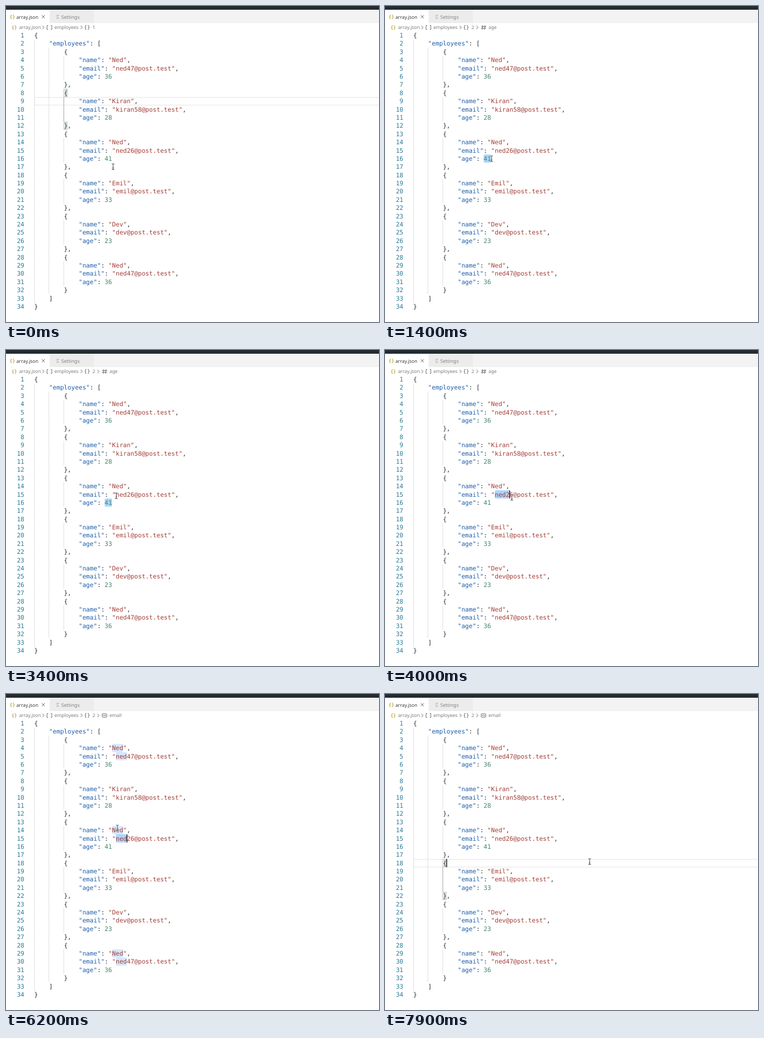
Animation, 700 px wide and 592 px high, one loop 8 s. Source, as an HTML page:

```html
<!DOCTYPE html>
<html lang="en">
<head>
<meta charset="utf-8">
<title>array.json</title>
<style>
html, body { margin: 0; width: 100%; height: 100%; overflow: hidden; background: #fff; }
svg { display: block; width: 700px; height: 592px; }
text { white-space: pre; text-rendering: geometricPrecision; }
.code { font: 11.55px "DejaVu Sans Mono", monospace; fill: #2a2f36; }
.num { fill: #2b7a97; text-anchor: end; }
.key { fill: #2060a8; }
.str { fill: #a43f37; }
.int { fill: #45836a; }
.ui { font: 8.9px "Noto Sans", sans-serif; fill: #3a3a3a; }
.dim { font-size: 9.1px; fill: #828282; }
.crumb { fill: #7b7b7b; }
.json { font: bold 8.5px "DejaVu Sans Mono", monospace; fill: #b8a640; }
.sym { font: 9.5px "DejaVu Sans Mono", monospace; fill: #555; }
.line { fill: none; stroke: #666; stroke-width: 1; }
</style>
</head>
<body>
<svg id="stage" viewBox="0 0 700 592"></svg>
<script>
const LOOP = 8000, STEP = 100;
const CHAR = 11.55 * 0.60205, ROW = 15.394, LEFT = 53, TOP = 47.3;
const colX = c => LEFT + c * CHAR;
const rowY = n => TOP + (n - 1) * ROW;

const person = (name, user, age) => ({ name, email: user + "@post.test", age });
const doc = JSON.stringify({
  employees: [
    person("Ned", "ned47", 36),
    person("Kiran", "kiran58", 28),
    person("Ned", "ned26", 41),
    person("Emil", "emil", 33),
    person("Dev", "dev", 23),
    person("Ned", "ned47", 36)
  ]
}, null, 4).split("\n");

// Each entry changes part of the editor state at its time.
const edits = [
  { t: 0, line: 9, pair: [8, 12], crumb: "1", caret: null, sel: null, marks: false },
  { t: 600, line: 16, pair: [13, 17], caret: [16, 19] },
  { t: 700, crumb: "age" },
  { t: 900, line: 0, pair: null, sel: [16, 19, 20], caret: [16, 20], marks: true },
  { t: 1100, sel: [16, 19, 21], caret: [16, 21] },
  { t: 3700, pair: [13, 17], sel: [15, 22, 25], caret: [15, 25] },
  { t: 3900, pair: null, sel: [15, 22, 26], caret: [15, 26], marks: false },
  { t: 4100, crumb: "email" },
  { t: 4700, sel: [15, 22, 25], caret: [15, 25] },
  { t: 5000, marks: true },
  { t: 7800, line: 18, sel: null, caret: [18, 9], marks: false },
  { t: 7900, pair: [18, 22] }
];
const caretOff = [[1400, 1900], [2400, 3000], [3400, 3700], [5600, 6000], [6500, 7100], [7500, 7800]];

// Pointer moves: first step time, number of steps, end point.
const moves = [
  [100, 4, 186, 290], [600, 7, 200, 286], [2300, 2, 199, 313], [3000, 5, 207, 273],
  [3700, 1, 225, 274], [3900, 2, 238, 276], [4100, 1, 239, 276], [4300, 3, 241, 276],
  [4700, 2, 231, 276], [5000, 2, 230, 276], [5300, 1, 229.5, 276], [5600, 2, 212, 248],
  [5900, 2, 207, 249], [6200, 1, 209, 251], [6300, 1, 216, 241], [6500, 1, 238, 180],
  [6600, 1, 221, 113], [6800, 1, 210, 110], [7100, 2, 212, 112], [7400, 2, 384, 314]
];

function add(parent, tag, attrs = {}, text = "") {
  const node = document.createElementNS("http://www.w3.org/2000/svg", tag);
  for (const k in attrs) node.setAttribute(k, attrs[k]);
  node.textContent = text;
  parent.append(node);
  return node;
}
const box = (parent, x, y, width, height, fill, more) =>
  add(parent, "rect", { x, y, width, height, fill, ...more });
const label = (parent, x, y, cls, text) => add(parent, "text", { x, y, class: cls }, text);
const stroke = (parent, d, style = "") => add(parent, "path", { d, class: "line", style });
const chevron = (parent, x) => stroke(parent, `M${x} 37l3.3 3.2l-3.3 3.2`);

const stage = document.getElementById("stage");
const layer = () => add(stage, "g");
const back = layer(), guides = layer(), code = layer(), chrome = layer(), crumbs = layer(), front = layer();

function drawCode() {
  doc.forEach((src, i) => {
    const n = i + 1, y = rowY(n) + 11.7;
    label(code, 34.3, y, "code num", n);
    const indent = src.search(/\S/);
    for (let c = 0; c < indent; c += 4)
      box(guides, Math.floor(colX(c)), rowY(n), 1, ROW, "#dedede");
    for (const m of src.matchAll(/"[^"]*"(?=:)|"[^"]*"|\d+|[^\s"\d]+/g)) {
      const s = m[0], after = src[m.index + s.length];
      const kind = s[0] === '"' ? (after === ":" ? "key" : "str") : /\d/.test(s) ? "int" : "";
      label(code, colX(m.index), y, "code " + kind, s);
    }
  });
}

function drawChrome() {
  box(chrome, 0, 0, 700, 7, "#242b30");
  box(chrome, 0, 7, 700, 25, "#f3f3f3");
  box(chrome, 0, 7, 82, 25, "#fff");
  box(chrome, 82, 7, 83, 25, "#ececec");
  label(chrome, 6.8, 23, "json", "{}");
  label(chrome, 19.6, 23.7, "ui", "array.json");
  stroke(chrome, "M67.3 17.3l5.6 5.6m0-5.6l-5.6 5.6");
  stroke(chrome, "M94.5 17.5h5.5M94.5 20.3h4M94.5 23.1h5.5", "stroke: #aaa");
  label(chrome, 103.7, 23.7, "ui dim", "Settings");
  label(chrome, 10.5, 43, "json", "{}");
  label(chrome, 24.4, 43.4, "ui crumb", "array.json");
  chevron(chrome, 68.3);
  stroke(chrome, "M79 36.5h-2v7.5h2M84 36.5h2v7.5h-2");
  label(chrome, 91, 43.4, "ui crumb", "employees");
  chevron(chrome, 140);
  label(chrome, 146.5, 43.2, "sym", "{}");
}

function drawCrumbs(name) {
  label(crumbs, 162.3, 43.4, "ui crumb", name === "1" ? "1" : "2");
  if (name === "1") return;
  chevron(crumbs, 171.5);
  if (name === "age") {
    stroke(crumbs, "M183.6 36l-1 8.5M187.8 36l-1 8.5M180.5 38.6h9.5M180 41.9h9.5");
  } else {
    add(crumbs, "rect", { x: 180.5, y: 37, width: 8.6, height: 6.4, rx: 1, class: "line" });
    stroke(crumbs, "M182.2 40.3h1.4m.6 0h1.4m.6 0h1.4", "stroke-width: 1.4");
  }
  label(crumbs, 194.2, 43.4, "ui crumb", name);
}

function pointerAt(t) {
  let x = 201, y = 301;
  for (const [start, steps, tx, ty] of moves) {
    if (t < start) break;
    const p = Math.min(1, ((t - start) / STEP + 1) / steps);
    x += (tx - x) * p;
    y += (ty - y) * p;
  }
  return [x, y];
}

function drawPointer(t) {
  const [x, y] = pointerAt(t);
  const g = add(front, "g", { transform: `translate(${x} ${y})`, fill: "none" });
  const d = "M-2.6-5.2H-1Q0-5.2 0-4V4Q0 5.2-1 5.2H-2.6M2.6-5.2H1Q0-5.2 0-4M0 4Q0 5.2 1 5.2H2.6M-1.3 2.2H1.3";
  add(g, "path", { d, stroke: "#fff", "stroke-width": 2.4, "stroke-opacity": 0.75 });
  add(g, "path", { d, stroke: "#4a4a4a", "stroke-width": 1.1 });
}

const span = (n, from, to, fill) =>
  box(back, colX(from), rowY(n), (to - from) * CHAR, ROW, fill, { rx: 2 });

function drawMarks([row, from, to]) {
  const word = doc[row - 1].slice(from, to).toLowerCase();
  doc.forEach((src, i) => {
    const at = src.toLowerCase().indexOf(word);
    if (at >= 0 && i !== row - 1) span(i + 1, at, at + word.length, "#d6e8fd");
  });
}

function drawPair([open, close]) {
  for (const n of [open, close])
    box(back, colX(8), rowY(n) + 0.5, CHAR - 0.6, ROW - 1, "#e5f0e5", { stroke: "#b9b9b9", "stroke-width": 0.9 });
  box(front, Math.floor(colX(8)), rowY(open + 1), 1, ROW * (close - open - 1), "#a2a2a2");
}

function render(t) {
  const s = Object.assign({}, ...edits.filter(e => e.t <= t));
  for (const g of [back, crumbs, front]) g.replaceChildren();
  if (s.line)
    box(back, 53.7, rowY(s.line) + 0.8, 660, ROW - 1, "none", { stroke: "#ebebeb", "stroke-width": 1.4 });
  if (s.sel) {
    if (s.marks) drawMarks(s.sel);
    span(...s.sel, "#add6ff");
  }
  if (s.pair) drawPair(s.pair);
  drawCrumbs(s.crumb);
  if (s.caret && !caretOff.some(([a, b]) => t >= a && t < b))
    box(front, colX(s.caret[1]) - 0.5, rowY(s.caret[0]), 1.4, ROW, "#111");
  drawPointer(t);
}

drawCode();
drawChrome();
let shown = -1;
const begin = performance.now();
function tick() {
  const t = Math.floor(((performance.now() - begin) % LOOP) / STEP) * STEP;
  if (t !== shown) render(shown = t);
  requestAnimationFrame(tick);
}
tick();
</script>
</body>
</html>
```
